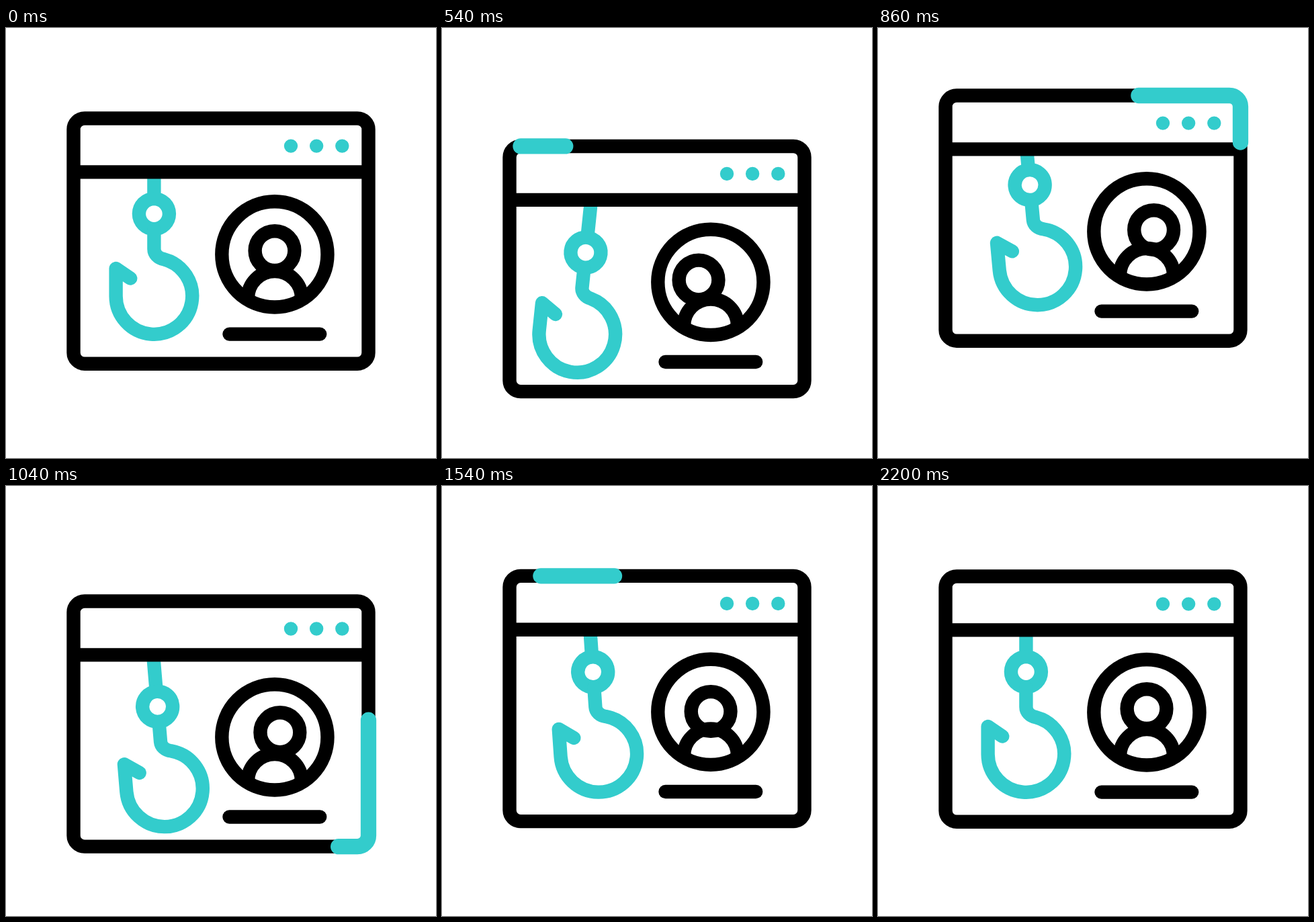
An HTML page for the animation above (2500 ms loop, 640x640 px).

```html
<!DOCTYPE html>
<html lang="en">
<head>
<meta charset="utf-8">
<title>Phishing window</title>
<style>
  html, body { margin: 0; width: 100%; height: 100%; overflow: hidden; background: #fff; }
  svg { display: block; width: 100vw; height: 100vh; }
  .line { fill: none; stroke: #000; stroke-width: 20.4; stroke-linecap: round; stroke-linejoin: round; }
  .flat { stroke-linecap: butt; }
  .teal { stroke: #33cccc; }
  .dots { stroke-dasharray: 0 38.15; }
  #trace { stroke-width: 23.3; }
</style>
</head>
<body>
<svg viewBox="0 0 640 640">
  <defs>
    <clipPath id="pane"><rect x="100" y="214" width="440" height="286"/></clipPath>
  </defs>
  <g id="win">
    <g clip-path="url(#pane)">
      <g id="hook" class="line teal">
        <path d="M220.4 150V254"/>
        <circle cx="220.4" cy="276.6" r="22.5"/>
        <path d="M185.2 372.6L163.6 358V399A56.8 56.8 0 1 0 234.9 344.1C226 342.5 220.4 336 220.4 329V300"/>
      </g>
    </g>
    <rect class="line" x="100.5" y="134.5" width="439" height="365.2" rx="16.5"/>
    <path class="line flat" d="M100 214.4H540"/>
    <path class="line teal dots" d="M424 175.6H501"/>
    <circle class="line" cx="399.9" cy="336.9" r="78.6"/>
    <path class="line flat" d="M360 402A40 40 0 0 1 440 402"/>
    <circle id="head" class="line" cx="400" cy="331.6" r="29.4"/>
    <path class="line" d="M332.5 455.6H467.2"/>
    <path id="trace" class="line teal" d="M117 134.5H523a16.5 16.5 0 0 1 16.5 16.5V483.2a16.5 16.5 0 0 1 -16.5 16.5H117a16.5 16.5 0 0 1 -16.5 -16.5V151a16.5 16.5 0 0 1 16.5 -16.5Z"/>
  </g>
</svg>
<script>
const LOOP = 2500;
const LAPS = 1.25;
const $ = id => document.getElementById(id);
const [win, hook, head, trace] = ['win', 'hook', 'head', 'trace'].map($);
const turn = trace.getTotalLength();

// Smooth step from 0 to 1 between two times.
function ease(t, from, to) {
  const u = Math.min(1, Math.max(0, (t - from) / (to - from)));
  return u * u * (3 - 2 * u);
}

// Leaves rest at `start`, eases through evenly spaced peaks, returns to rest.
const wave = (start, step, peaks) => t =>
  [...peaks, 0].reduce((sum, peak, i) => {
    const from = start + i * step;
    return sum + (peak - (peaks[i - 1] || 0)) * ease(t, from, from + step);
  }, 0);

const bob = wave(200, 300, [46, -43.6, 46, -12, 13]);
const drop = wave(200, 300, [18, -12, 18, -5, 8]);
const headX = wave(200, 345, [-18, 11.2, 3]);
const headY = wave(200, 345, [2, 3, -9, 5]);

// Side to side, halving after each full swing.
const swing = wave(340, 300, Array.from({ length: 5 }, (_, i) => 8 * (-1) ** i / 2 ** (i >> 1)));

function draw(t) {
  win.setAttribute('transform', `translate(0 ${bob(t)})`);
  hook.setAttribute('transform', `translate(0 ${drop(t)}) rotate(${swing(t)} 220.4 214.5)`);
  head.setAttribute('transform', `translate(${headX(t)} ${headY(t)})`);

  const tail = LAPS * turn * ease(t, 540, 1920);
  const len = LAPS * turn * ease(t, 375, 1880) - tail;
  trace.style.display = len > 0.1 ? '' : 'none';
  trace.style.strokeDasharray = `${len} ${turn - len}`;
  trace.style.strokeDashoffset = -tail;
}

const start = performance.now();
function tick() {
  draw((performance.now() - start) % LOOP);
  requestAnimationFrame(tick);
}
draw(0);
requestAnimationFrame(tick);
</script>
</body>
</html>
```
